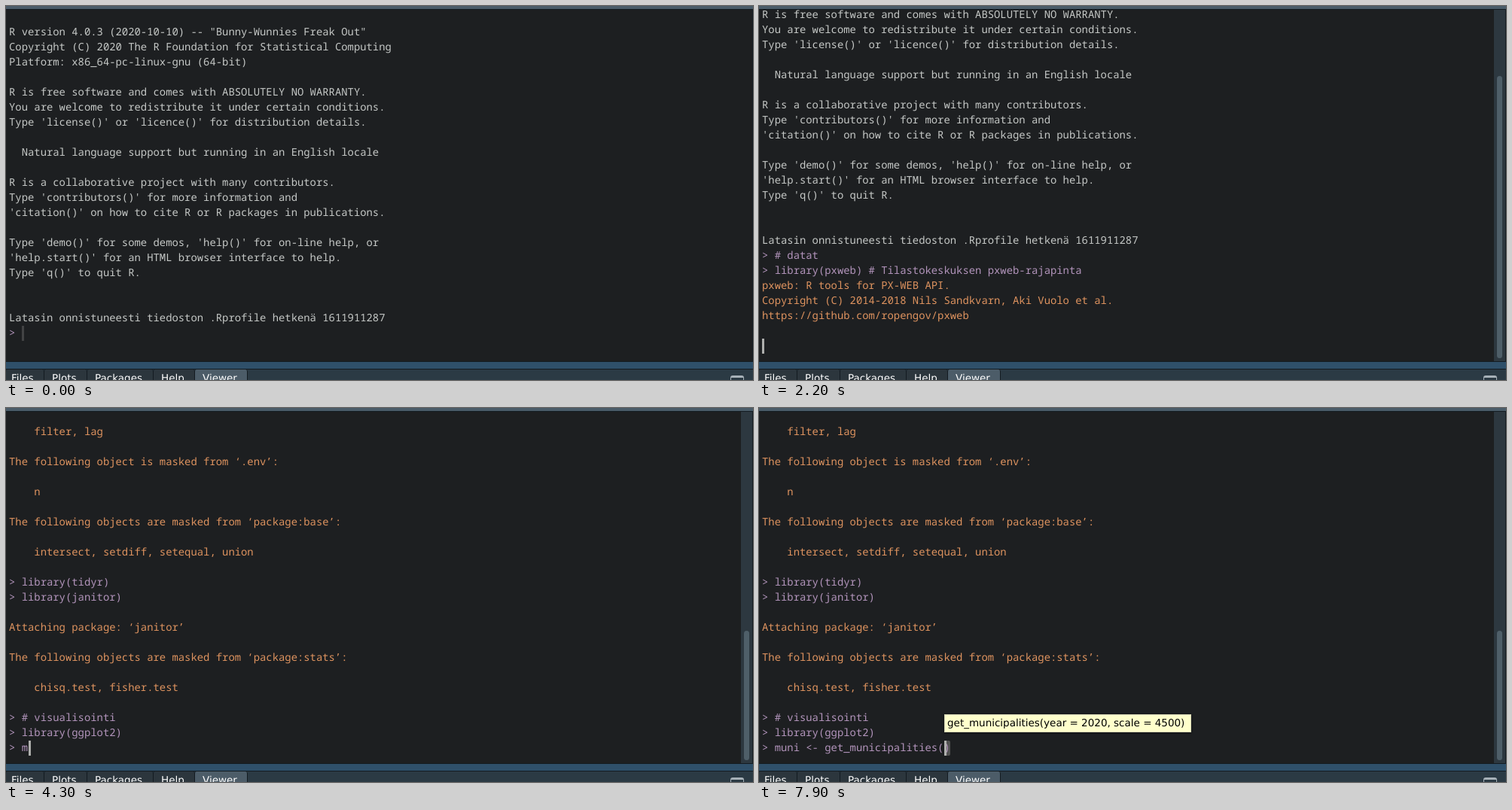
An HTML page that plays this animation: 992x497 px, repeating every 8000 ms.

```html
<!DOCTYPE html>
<html lang="en">
<head>
<meta charset="utf-8">
<title>R console</title>
<style>
  html, body { margin: 0; width: 100%; height: 100%; overflow: hidden; background: #1d1f21; }
  body { text-rendering: geometricPrecision; }
  #stage { position: relative; width: 992px; height: 497px; overflow: hidden; background: #1d1f21; }
  #stage div { position: absolute; box-sizing: border-box; }
  #top { left: 0; top: 0; width: 992px; height: 5px; background: #4a5c69; border-bottom: 1px solid #131b21; }
  #frame { left: 0; top: 5px; width: 992px; height: 468px; border: solid #131b21; border-width: 0 1px 1px 0; }
  #pane { left: 0; top: 5px; width: 991px; height: 467px; overflow: hidden; }
  #doc { left: 0; top: 0; width: 976px; font: 500 13.889px/20px "Noto Sans Mono", "DejaVu Sans Mono", monospace; }
  #doc .row { left: 4px; height: 20px; white-space: pre; z-index: 1; }
  .fg { color: #c5c8c6; }
  .cmd { color: #b294bb; }
  .msg { color: #de935f; }
  #cursor { width: 3px; height: 20px; background: #aeafad; z-index: 2; }
  #match { width: 8px; height: 20px; background: #515151; border-radius: 2px; }
  #track { left: 976px; top: 0; width: 15px; height: 467px; background: #2d3840; }
  #thumb { left: 4px; width: 7px; border-radius: 3.5px; background: #4f5f69; }
  #split { left: 0; top: 473px; width: 992px; height: 9px; background: #2f506a; }
  #tabs { left: 0; top: 482px; width: 992px; height: 15px; background: #2b3a44; border-top: 1px solid #131b21; overflow: hidden; }
  .tab { top: 0; height: 30px; padding-top: 4px; font: 13.5px/16px "DejaVu Sans", sans-serif; color: #fff;
         background: #2c363d; border: solid #131b21; border-width: 0 1px; border-radius: 3px 3px 0 0; white-space: pre; }
  .tab.on { background: #4c5c68; }
  #max { left: 962px; top: 8px; width: 18px; height: 16px; border: 1px solid #a7b1b8; border-top-width: 3px; border-radius: 3px 3px 0 0; }
  #tip { left: 246px; top: 407px; width: 328px; height: 24px; padding-left: 3px; background: #ffffcc; color: #000;
         border: 1px solid #d8d8b4; box-shadow: 0 1px 3px rgba(0,0,0,.5);
         font: 13.5px/22px "DejaVu Sans", sans-serif; white-space: pre; }
</style>
</head>
<body>
<div id="stage">
  <div id="frame"></div>
  <div id="pane">
    <div id="doc"></div>
    <div id="track"><div id="thumb"></div></div>
  </div>
  <div id="top"></div>
  <div id="split"></div>
  <div id="tabs"><div id="max"></div></div>
  <div id="tip">get_municipalities(year = 2020, scale = 4500)</div>
</div>
<script>
const LOOP = 8000, VIEW = 467, LINE = 20, CHAR = 8.3333;

const banner = `
R version 4.0.3 (2020-10-10) -- "Bunny-Wunnies Freak Out"
Copyright (C) 2020 The R Foundation for Statistical Computing
Platform: x86_64-pc-linux-gnu (64-bit)

R is free software and comes with ABSOLUTELY NO WARRANTY.
You are welcome to redistribute it under certain conditions.
Type 'license()' or 'licence()' for distribution details.

  Natural language support but running in an English locale

R is a collaborative project with many contributors.
Type 'contributors()' for more information and
'citation()' on how to cite R or R packages in publications.

Type 'demo()' for some demos, 'help()' for on-line help, or
'help.start()' for an HTML browser interface to help.
Type 'q()' to quit R.


Latasin onnistuneesti tiedoston .Rprofile hetkenä 1611911287`.split("\n");

const session = `> # datat
> library(pxweb) # Tilastokeskuksen pxweb-rajapinta
pxweb: R tools for PX-WEB API.
Copyright (C) 2014-2018 Nils Sandkvarn, Aki Vuolo et al.
https://github.com/ropengov/pxweb

> library(geofi) # Tilastokeskuksen wfs-rajapinta

geofi R package: tools for open GIS data for Finland
Part of rOpenGov <ropengov.github.io>.
> # käsittely & siivoaminen
> library(dplyr)

Attaching package: ‘dplyr’

The following objects are masked from ‘package:stats’:

    filter, lag

The following object is masked from ‘.env’:

    n

The following objects are masked from ‘package:base’:

    intersect, setdiff, setequal, union

> library(tidyr)
> library(janitor)

Attaching package: ‘janitor’

The following objects are masked from ‘package:stats’:

    chisq.test, fisher.test

> # visualisointi
> library(ggplot2)`.split("\n");

// The pasted script is the list of commands, indented under one prompt
const paste = session.filter(s => s[0] === ">").map((s, i) => i ? "  " + s.slice(2) : s);
const call = "muni <- get_municipalities()";

const step = (time, done, input, scroll, col, glow = 1) => ({ time, done, input, scroll, col, glow });
const END = session.length, BOTTOM = 743;

// time, session lines printed, input, scroll, cursor column, cursor opacity
const steps = [
  step(0, 0, ["> "], 0, 2, 0.25),
  step(400, 0, ["> "], 0, 2),
  step(1000, 0, paste, 143, 18),
  step(1600, 0, paste, 143, 18, 0),
  step(2000, 1, [""], 0, 0),
  step(2100, 2, [""], 23, 0),
  step(2200, 6, [""], 103, 0),
  step(2300, 7, [""], 123, 0),
  step(2400, 10, [""], 123, 0),
  step(3000, END, ["> "], BOTTOM, 2),
  step(3400, END, ["> "], BOTTOM, 2, 0),
  step(3800, END, ["> "], BOTTOM, 2)
];
const keys = [4300, 4500, 4600, 4700, 4800, 5100, 5200, 5300, 5700, 5800, 6200, 6400, 6700, 7000, 7100, 7200];
keys.forEach((time, i) => steps.push(step(time, END, ["> " + call.slice(0, i + 1)], BOTTOM, i + 3)));
steps.push(step(7800, END, ["> " + call], BOTTOM, 29));
const TIP_AT = 7900;

const $ = id => document.getElementById(id);
const add = (parent, cls, text = "") => {
  const el = document.createElement("div");
  el.className = cls;
  el.textContent = text;
  return parent.appendChild(el);
};

[["Files", -1, 52, 8], ["Plots", 50, 58, 62], ["Packages", 107, 89, 119],
 ["Help", 195, 56, 207], ["Viewer", 250, 71, 262]].forEach(([name, x, w, textX]) => {
  const tab = add($("tabs"), name === "Viewer" ? "tab on" : "tab", name);
  tab.style.left = x + "px";
  tab.style.width = w + "px";
  tab.style.paddingLeft = textX - x - 2 + "px";
});

const makeRow = (text, cls, i) => {
  const row = add($("doc"), "row " + cls, text);
  row.style.top = i * LINE + "px";
};
const cursorX = col => Math.round(4 + CHAR * col) + (col && col % 3 === 0 ? 1 : 0);
const place = (id, x, row) => {
  const el = add($("doc"), "");
  el.id = id;
  el.style.left = x + "px";
  el.style.top = row * LINE + "px";
  return el;
};

function render(s) {
  const doc = $("doc");
  doc.textContent = "";
  const out = session.slice(0, s.done);
  const rows = [
    ...banner.map(t => [t, "fg"]),
    ...out.map(t => [t, t[0] === ">" ? "cmd" : "msg"]),
    ...s.input.map(t => [t, "cmd"])
  ];
  rows.forEach(([text, cls], i) => text && makeRow(text, cls, i));

  const last = rows.length - 1, x = cursorX(s.col);
  if (s.input[0].endsWith("()")) place("match", x, last);
  place("cursor", x, last).style.opacity = s.glow;
  doc.style.top = -s.scroll + "px";

  const height = rows.length * LINE + 10, ratio = VIEW / height;
  $("track").style.display = height > VIEW ? "" : "none";
  $("thumb").style.top = 4 + s.scroll * ratio + "px";
  $("thumb").style.height = VIEW * ratio - 8 + "px";
}

let shown = null;
const start = performance.now();
function tick() {
  const t = (performance.now() - start) % LOOP;
  const now = steps.filter(s => s.time <= t).pop();
  if (now !== shown) render(shown = now);
  $("tip").style.display = t >= TIP_AT ? "" : "none";
  requestAnimationFrame(tick);
}
tick();
</script>
</body>
</html>
```
